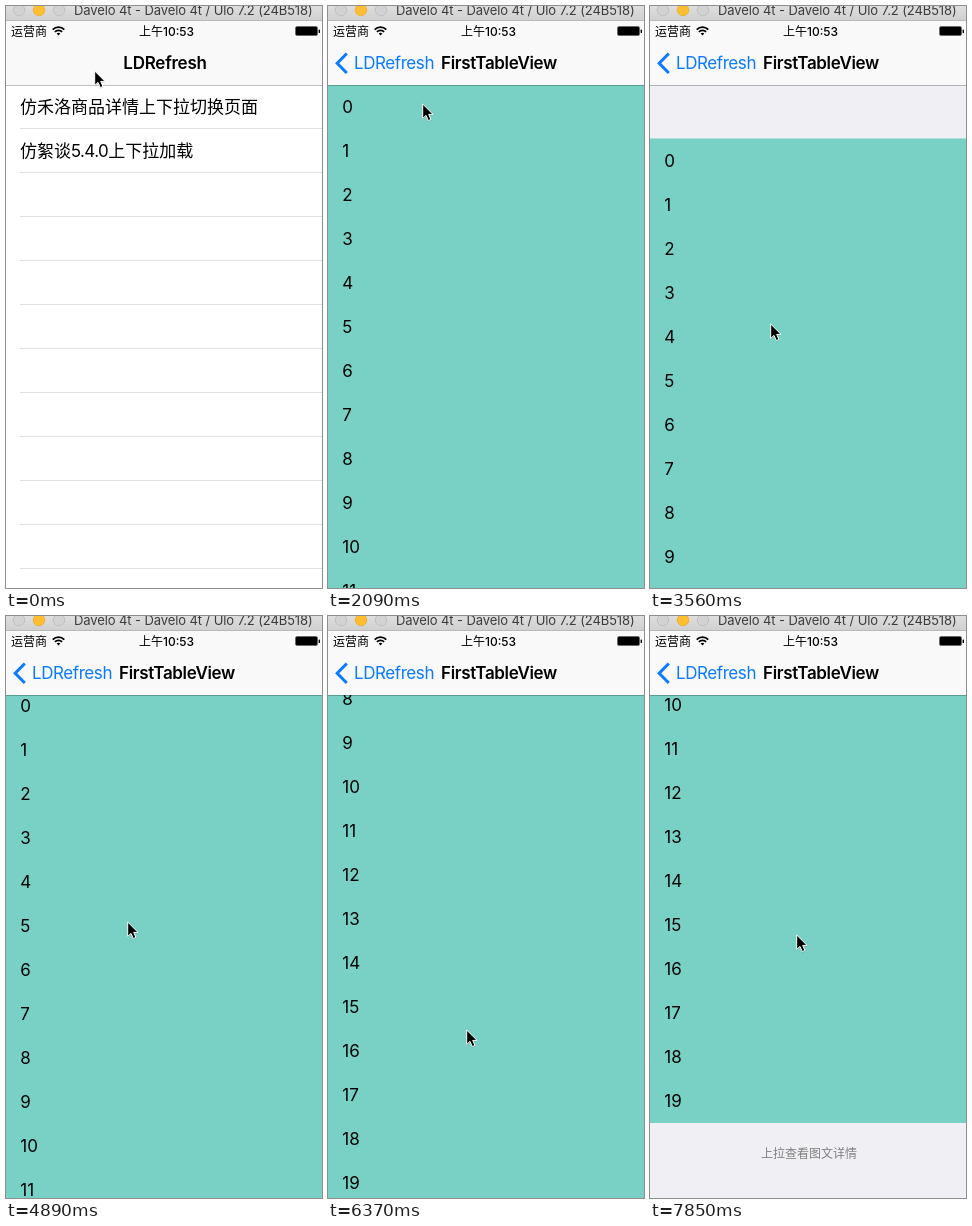
Recreate the animation shown at these times as an HTML page. Size 316 px wide and 582 px high, loop 8 s.

```html
<!DOCTYPE html>
<html lang="zh-CN">
<head>
<meta charset="utf-8">
<title>LDRefresh</title>
<style>
html, body { margin: 0; width: 100%; height: 100%; overflow: hidden; background: #fff; }
svg { display: block; width: 100%; height: 100%; }
text { font-family: Inter, "Noto Sans CJK SC", "Noto Sans CJK", sans-serif; font-size: 17px; fill: #000; white-space: pre; }
.bold { font-weight: 600; letter-spacing: -.25px; text-anchor: middle; }
.num { letter-spacing: .1px; }
.status { font-size: 12px; }
.window { font-size: 13px; letter-spacing: -.1px; fill: #3c3c3c; }
.back { fill: #0a7aff; letter-spacing: -.42px; }
.foot { font-size: 12px; fill: #808080; text-anchor: middle; }
</style>
</head>
<body>
<svg viewBox="0 0 316 582" preserveAspectRatio="none">
  <defs>
    <linearGradient id="edge">
      <stop offset="0" stop-opacity="0"/>
      <stop offset="1" stop-opacity=".2"/>
    </linearGradient>
    <linearGradient id="chrome" x2="0" y2="1">
      <stop offset="0" stop-color="#dedede"/>
      <stop offset="1" stop-color="#d0d0d0"/>
    </linearGradient>
  </defs>

  <rect width="316" height="582" fill="#fff"/>
  <g id="menu">
    <rect id="selected" x="-1" y="79" width="320" height="44" fill="#d9d9d9"/>
    <g id="lines" fill="#dfdfe1"></g>
    <text x="14" y="107">仿禾洛商品详情上下拉切换页面</text>
    <text x="14" y="151">仿絮谈<tspan letter-spacing="-.6">5.4.0</tspan>上下拉加载</text>
  </g>
  <rect id="dim" y="79" width="316" height="503"/>

  <g id="panel">
    <rect x="-7" y="79" width="6" height="503" fill="url(#edge)"/>
    <rect x="-1" y="79" width="320" height="503" fill="#efeff4"/>
    <g id="rows">
      <rect x="-1" y="79" width="320" height="880" fill="#78d1c4"/>
      <text class="foot" x="159" y="993.5">上拉查看图文详情</text>
    </g>
  </g>

  <rect id="nav" y="14" width="316" height="65"/>
  <rect y="79" width="316" height="1" opacity=".25"/>
  <text id="oldTitle" class="bold" x="159" y="63">LDRefresh</text>
  <text id="newTitle" class="bold" x="171" y="63" style="letter-spacing:-.35px">FirstTableView</text>
  <path id="chevron" d="M18.8 47.5 9.2 57.2 18.8 67" fill="none" stroke="#0a7aff" stroke-width="3"/>
  <text id="back" class="back" x="26" y="63">LDRefresh</text>

  <text class="status" x="5" y="29.5">运营商</text>
  <g fill="none" stroke="#000" stroke-width="1.8">
    <path d="M46.7 23.6a8.2 8.2 0 0 1 11.6 0M48.9 25.9a5.1 5.1 0 0 1 7.2 0"/>
    <path d="M52.5 29.4 50.7 27.6a2.5 2.5 0 0 1 3.6 0z" fill="#000" stroke="none"/>
  </g>
  <text class="status" x="160.5" y="29.5" text-anchor="middle" font-weight="500">上午10:53</text>
  <rect x="289.5" y="20.5" width="22" height="9" rx="1.5" stroke="#666" stroke-width=".8"/>
  <rect x="312.6" y="23.5" width="1.4" height="3.5" rx=".6"/>

  <rect width="316" height="14" fill="url(#chrome)"/>
  <rect y="14" width="316" height="1" fill="#b9b9b9"/>
  <g stroke-width=".8">
    <circle cx="13" cy="4" r="5.8" fill="#d2d2d2" stroke="#bcbcbc"/>
    <circle cx="33" cy="4" r="5.8" fill="#fdbe2f" stroke="#e8ae38"/>
    <circle cx="53" cy="4" r="5.8" fill="#d2d2d2" stroke="#bcbcbc"/>
  </g>
  <text class="window" x="68" y="9">Davelo 4t - Davelo 4t / Ulo 7.2 (24B518)</text>

  <g id="cursor" stroke-linejoin="round">
    <path d="M0 1.2V15.6L3.3 12.6 5.6 17.8 8.2 16.6 6 11.6H10.4Z" opacity=".2"/>
    <path d="M0 0V14.4L3.3 11.4 5.6 16.6 8.2 15.4 6 10.4H10.4Z" stroke="#fff"/>
  </g>
</svg>
<script>
const LOOP = 8000, STEP = 148, LAST = 53, ROW = 44;
const $ = id => document.getElementById(id);

function add(parent, tag, attrs, text = '') {
  const el = document.createElementNS('http://www.w3.org/2000/svg', tag);
  for (const key in attrs) el.setAttribute(key, attrs[key]);
  el.textContent = text;
  $(parent).append(el);
}

for (let i = 0; i < 11; i++) add('lines', 'rect', { x: 14, y: 122 + ROW * i, width: 305, height: 1 });
for (let i = 0; i < 20; i++) add('rows', 'text', { class: 'num', x: 14.3, y: 107 + ROW * i }, i);

// Progress from 0 to 1 between two steps: linear, eased out, eased both ways.
const span = (k, from, to) => Math.min(1, Math.max(0, (k - from) / (to - from)));
const out = (k, from, to) => 1 - (1 - span(k, from, to)) ** 2.08;
const smooth = (k, from, to) => { const u = span(k, from, to); return u * u * (3 - 2 * u); };

const move = (id, x, y = 0) => $(id).setAttribute('transform', `translate(${x} ${y})`);
const fade = (id, value) => $(id).setAttribute('opacity', value);

function drawPush(p) {
  const rest = 1 - p, open = p > 0 ? 1 : 0;
  move('menu', -96 * p);
  fade('selected', open);
  fade('dim', .1 * p);
  move('panel', 320 * rest);
  fade('panel', open);

  $('nav').setAttribute('fill', open && rest ? '#f5f5f5' : '#f9f9f9');
  move('oldTitle', -78 * p);
  fade('oldTitle', rest * rest);
  move('newTitle', 231 * rest);
  fade('newTitle', p ** 1.3);
  move('back', 90 * rest);
  fade('back', Math.max(0, 2 * p - 1));
  fade('chevron', p ** 4);
}

function drawGestures(k) {
  const aim = smooth(k, 3, 7), reach = smooth(k, 14, 17);
  const pull = out(k, 18, 24), release = smooth(k, 24, 28);
  const drag = span(k, 30, 33), flick = span(k, 33, 35), fling = smooth(k, 33, 41);
  const back = smooth(k, 36, 42), lift = smooth(k, 43, 46), hold = out(k, 46, 53);

  move('rows', 0, 53.5 * (pull - release) - 11 * drag - 359 * fling - 66 * lift - 16 * hold);
  move('cursor',
    88.7 + 6 * aim + 26 * reach + drag + 17 * back + 4.5 * lift + 3.5 * hold,
    65 + 33 * aim + 110 * reach + 110 * pull - 12 * drag - 106 * flick + 214 * back - 77 * lift - 18 * hold);
}

function draw(time) {
  const k = Math.min(LAST, Math.max(0, Math.floor((time - 4) / STEP)));
  drawPush(out(k, 10, 14));
  drawGestures(k);
}

function tick() {
  draw(performance.now() % LOOP);
  requestAnimationFrame(tick);
}
tick();
</script>
</body>
</html>
```
